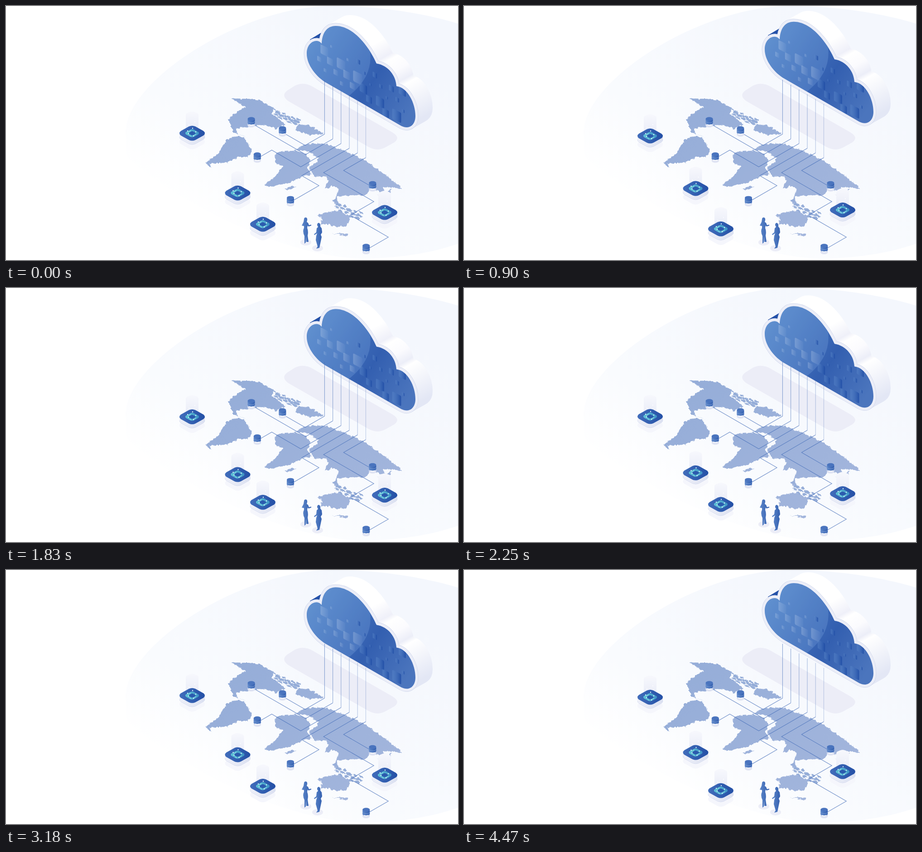
An HTML page that plays this animation: 998x561 px, repeating every 4500 ms.

```html
<!DOCTYPE html>
<html lang="en">
<head>
<meta charset="utf-8">
<title>Cloud network</title>
<style>
  html, body { margin: 0; width: 100%; height: 100%; overflow: hidden; background: #fff; }
  svg { display: block; width: 998px; height: 561px; }
</style>
</head>
<body>
<svg viewBox="0 0 998 561">
  <defs>
    <linearGradient id="haze" gradientUnits="userSpaceOnUse" x1="800" y1="30" x2="420" y2="570">
      <stop stop-color="#f4f7fd"/><stop offset=".6" stop-color="#f9fbfe"/><stop offset=".87" stop-color="#fff"/>
    </linearGradient>
    <linearGradient id="side" gradientUnits="userSpaceOnUse" x1="720" y1="40" x2="853" y2="283">
      <stop offset=".3" stop-color="#fff"/><stop offset=".43" stop-color="#eff0f9"/><stop offset=".47" stop-color="#fff"/>
      <stop offset=".57" stop-color="#fbfbfe"/><stop offset=".66" stop-color="#eceef8"/><stop offset=".7" stop-color="#fff"/>
      <stop offset="1" stop-color="#e3e7f5"/>
    </linearGradient>
    <linearGradient id="face" gradientUnits="userSpaceOnUse" x1="664" y1="90" x2="890" y2="240">
      <stop stop-color="#5081c5"/><stop offset=".6" stop-color="#335fb0"/><stop offset="1" stop-color="#4b75bd"/>
    </linearGradient>
    <linearGradient id="land" gradientUnits="userSpaceOnUse" x1="500" y1="200" x2="780" y2="500">
      <stop stop-color="#95add8"/><stop offset="1" stop-color="#a2b5dc"/>
    </linearGradient>
    <linearGradient id="light"><stop stop-color="#fff" stop-opacity=".2"/><stop offset="1" stop-color="#fff" stop-opacity=".03"/></linearGradient>
    <linearGradient id="dark"><stop stop-color="#5f8ccc" stop-opacity=".4"/><stop offset="1" stop-color="#1c4aa4" stop-opacity=".8"/></linearGradient>
    <linearGradient id="top"><stop stop-color="#416dbb"/><stop offset="1" stop-color="#2450a6"/></linearGradient>
    <linearGradient id="rim"><stop stop-color="#eef0f9"/><stop offset="1" stop-color="#dce1f1"/></linearGradient>
    <linearGradient id="disc"><stop stop-color="#5c86c8"/><stop offset="1" stop-color="#3460b0"/></linearGradient>
    <linearGradient id="teal"><stop stop-color="#5fc3d6"/><stop offset="1" stop-color="#3f94c4"/></linearGradient>
    <linearGradient id="beam" x2="0" y2="1"><stop stop-color="#f7f8fd"/><stop offset="1" stop-color="#e9ecf7"/></linearGradient>
    <filter id="coast" color-interpolation-filters="sRGB">
      <feTurbulence type="fractalNoise" baseFrequency=".17" numOctaves="2" seed="4"/>
      <feDisplacementMap in="SourceGraphic" scale="7" xChannelSelector="R" yChannelSelector="G"/>
    </filter>
    <path id="outline" d="M664 105C664 88 674 77 686 77Q692 77 697 83C698 60 708 44 728 44C766 44 801 88 818 127C844 131 861 154 862 177C887 180 904 215 904 243C904 262 891 274 873 265L708 170C685 157 664 130 664 105Z"/>
    <path id="slab" d="M-25 -5Q-31 0 -25 5L-7 15Q0 18 7 15L25 5Q31 0 25 -5L7 -15Q0 -18 -7 -15Z"/>
    <clipPath id="inside"><use href="#outline"/></clipPath>

    <g id="chip">
      <use href="#slab" y="19" fill="#f5f6fc"/>
      <path d="M-14 -40Q-14 -43 -10 -45L-5 -47Q0 -49 5 -47L10 -45Q14 -43 14 -40V-4H-14Z" fill="url(#beam)"/>
      <use href="#slab" y="8.5" fill="url(#rim)" stroke="#cfd6ec" stroke-width=".7"/>
      <path d="M-28 0H28V8.5H-28Z" fill="url(#rim)"/>
      <use href="#slab" fill="url(#top)"/>
      <use href="#slab" transform="scale(.54)" fill="url(#teal)"/>
      <use href="#slab" transform="scale(.27)" fill="#2c5aae"/>
      <path d="M-9 -2L-3 -6M3 6L9 2M-6 5L-2 7" stroke="#8fdce6" stroke-width="1.2"/>
      <path d="M-8 1h0M8 -3h0M1 -11h0M-10 -5h0M3 6h0" stroke="#e6fbff" stroke-width="2.4" stroke-linecap="round"/>
      <path d="M6 -25h0M-7 -19h0" stroke="#fff" stroke-width="2" stroke-linecap="round"/>
    </g>

    <g id="store">
      <path d="M-8 4V10A8 4 0 0 0 8 10V4Z" fill="#e0e4f3"/>
      <ellipse cy="5" rx="8" ry="4" fill="#7e9bd0"/>
      <ellipse cy="6" rx="5.5" ry="2.4" fill="#eef1fa"/>
      <path d="M-8 -4V4A8 4 0 0 0 8 4V-4Z" fill="url(#disc)"/>
      <path d="M-8 0A8 4 0 0 0 8 0M-8 4A8 4 0 0 0 8 4" fill="none" stroke="#86a5d8" stroke-width=".8"/>
      <path d="M-5 7.5A6 2.5 0 0 0 5 7.5" fill="none" stroke="#fff" stroke-width="1.6"/>
      <ellipse cy="-5" rx="8" ry="4" fill="#4a74be"/>
    </g>
  </defs>

  <path fill="url(#haze)" d="M264 280C264 165 520 0 720 0C820 0 920 15 998 39V525C940 545 880 555 800 558C600 561 330 400 267 333Q264 306 264 280Z"/>
  <path fill="#ecedf7" d="M622 186L638 176Q656 167 675 177L853 279Q873 291 856 302L838 312Q820 322 800 311L625 211Q605 198 622 186Z"/>

  <g fill="url(#land)" filter="url(#coast)">
    <!-- the Americas and Greenland -->
    <path d="M497 204L535 205L560 208L591 225L587 238L603 250L617 262L596 271L566 262L530 267L507 271L512 283L540 293L502 279L491 250L506 236L530 224Z"/>
    <path d="M646 262L668 263L703 282L672 285L638 274Z"/>
    <path d="M487 295L508 287L526 290L544 320L534 333H511L502 340L486 346L450 348L453 358L440 347L470 325Z"/>
    <!-- Africa and Madagascar -->
    <path d="M593 329L604 322L642 319L663 328L672 340L665 358L675 372L654 376L627 390L582 399L571 394L595 377L611 353L596 347Z"/>
    <path d="M614 403L632 398L641 399L622 406Z"/>
    <!-- Europe and Asia -->
    <path d="M640 317L652 309L681 303L712 306L765 327L794 342L837 373L877 404L846 400L833 401L837 413L806 405L793 418L756 419L731 420L734 437L722 433L730 417L735 404L720 396L712 403L704 402L712 387L705 376L682 377L669 357L686 345L689 335L668 321Z"/>
    <!-- Australia, New Zealand and Japan -->
    <path d="M686 462L712 454L738 452L760 466L752 486L730 488L712 482L694 482L698 469Z"/>
    <path d="M720 502L757 504L752 508Z"/>
    <path d="M820 418L849 413L852 403L841 410Z"/>
    <g id="islands"></g>
  </g>

  <g id="cloud">
    <g id="depth" fill="url(#side)" stroke="url(#side)" stroke-width="12" stroke-linejoin="round"></g>
    <path d="M671 74L696 59V80H676Z" fill="#2451a8"/>
    <use href="#outline" fill="none" stroke="#cdd5ea" stroke-width="13" stroke-linejoin="round"/>
    <use href="#outline" fill="none" stroke="#eceef8" stroke-width="11.6" stroke-linejoin="round"/>
    <use href="#outline" fill="url(#face)"/>
    <g clip-path="url(#inside)">
      <path d="M650 30H780L803 95Q814 155 755 200H650Z" fill="#a9d2ff" opacity=".17"/>
      <g id="tiles"></g>
    </g>
  </g>

  <g id="wires" fill="none" stroke="#4a72bb"></g>
  <g id="stores"></g>

  <g fill="#ecedf7"><ellipse cx="662" cy="522" rx="12" ry="7"/><ellipse cx="688" cy="535" rx="12" ry="7"/></g>
  <g fill="url(#disc)">
    <path d="M658 471Q658 467 662 467Q666 468 665 473L664 477L667 479L669 484L674 483V485L668 487L666 485L665 490Q668 498 666 507L668 521H663L662 509L662 522L659 525L659 508Q654 498 658 490V486L653 485L657 477Z"/>
    <path d="M687 484Q687 479 691 479Q695 481 694 487L697 491L698 500L695 505L697 510L692 534L685 536L688 531L684 517L685 508L687 502L681 506L680 504L685 500L686 491L689 488Z"/>
  </g>
  <g id="chips"></g>
</svg>

<script>
const el = id => document.getElementById(id);
const fill = (id, items, draw) => el(id).innerHTML = items.map(draw).join('');
const range = n => [...Array(n).keys()];
const use = (id, x, y) => `<use href="#${id}" x="${x}" y="${y}"/>`;
const spread = (i, step) => i * step % 1;   // evenly scattered values in 0..1
const ISO = Math.tan(Math.PI / 6);

// Cloud thickness: stacked copies from back to front
fill('depth', range(24), i => use('outline', 32 * (1 - i / 24), -18 * (1 - i / 24)));

// Panels scattered along the cloud face, brighter on its left half
fill('tiles', range(28), i => {
  const x = 680 + i * 7.2, y = 110 + (x - 690) * .6 + (spread(i, .618) - .6) * 78;
  const size = 5 + 20 * spread(i, .414) ** 1.5;
  return `<rect width="${size * .85}" height="${size}" rx="${size / 9}" transform="translate(${x} ${y}) skewY(27)"
    fill="url(#${x < 773 ? 'light' : 'dark'})"/>`;
});

// Two island chains: the Arctic and south-east Asia
const chain = (x, y, length, slope, width) => range(14).map(i => {
  const along = length * i / 13;
  return [x + along, y + along * slope + (spread(i, .618) - .5) * width, 4 + 4 * spread(i, .414)];
});
fill('islands', [...chain(592, 236, 54, .4, 16), ...chain(726, 440, 58, .45, 20)], ([x, y, r]) =>
  `<ellipse rx="${r}" ry="${r * .4}" transform="translate(${x} ${y}) rotate(25)"/>`);

// Each wire drops from the cloud, follows compass legs on the ground grid and ends at a store
const routes = ['sw43 nw50', 'sw60 nw120', 'sw89 nw64 sw32', 'sw105 se38 sw63', 'sw75 se111 sw52 se84 sw49', 'sw49 se64'];
const wires = routes.map((route, i) => {
  const drop = { x: 703.4 + 18.2 * i, y: 283 + 10.4 * i }, end = { ...drop };
  let path = `M${drop.x} ${drop.y}`;
  for (const leg of route.split(' ')) {
    const length = +leg.slice(2);
    end.x += leg[1] === 'e' ? length : -length;
    end.y += (leg[0] === 's' ? length : -length) * ISO;
    path += `L${end.x} ${end.y}`;
  }
  return { drop, end, path };
});
fill('wires', wires, ({ drop, path }, i) =>
  `<path d="M${drop.x} ${drop.y}V${163 + 10.6 * i}" opacity="${.72 - i * .07}"/><path d="${path}" stroke-width="1.2" opacity=".75"/>`);
fill('stores', wires, ({ end }) => use('store', end.x, end.y - 4.5));

// Floating parts: resting place and vertical offset at the start of every beat
const chips = [
  { x: 411, y: 281, drift: [0, 6, 3.5, 2, -8.3] },
  { x: 511.5, y: 413, drift: [0, -10, -1, -8.6, -2.3, -10] },
  { x: 567, y: 482, drift: [0, 10.3, -8.8, .6, -8.6, 5.2] },
  { x: 836, y: 456, drift: [0, -5.6, 1.5, -5.2, -1.2, -10.7] }];
fill('chips', chips, ({ x, y }) => use('chip', x, y));
const floaters = [{ node: el('cloud'), drift: [0, -9.3, 2.5, -10, -2.3, -15] },
  ...chips.map(({ drift }, i) => ({ node: el('chips').children[i], drift }))];

const LOOP = 4500, BEAT = 900, TICK = 30;
const start = performance.now();
function frame() {
  const t = Math.floor((performance.now() - start) % LOOP / TICK) * TICK;
  const beat = Math.floor(t / BEAT), ease = (1 - Math.cos(Math.PI * (t / BEAT - beat))) / 2;
  for (const { node, drift } of floaters) {
    const from = drift[beat], to = drift[beat + 1] ?? 0;
    node.setAttribute('transform', `translate(0 ${(from + (to - from) * ease).toFixed(2)})`);
  }
  requestAnimationFrame(frame);
}
frame();
</script>
</body>
</html>
```
